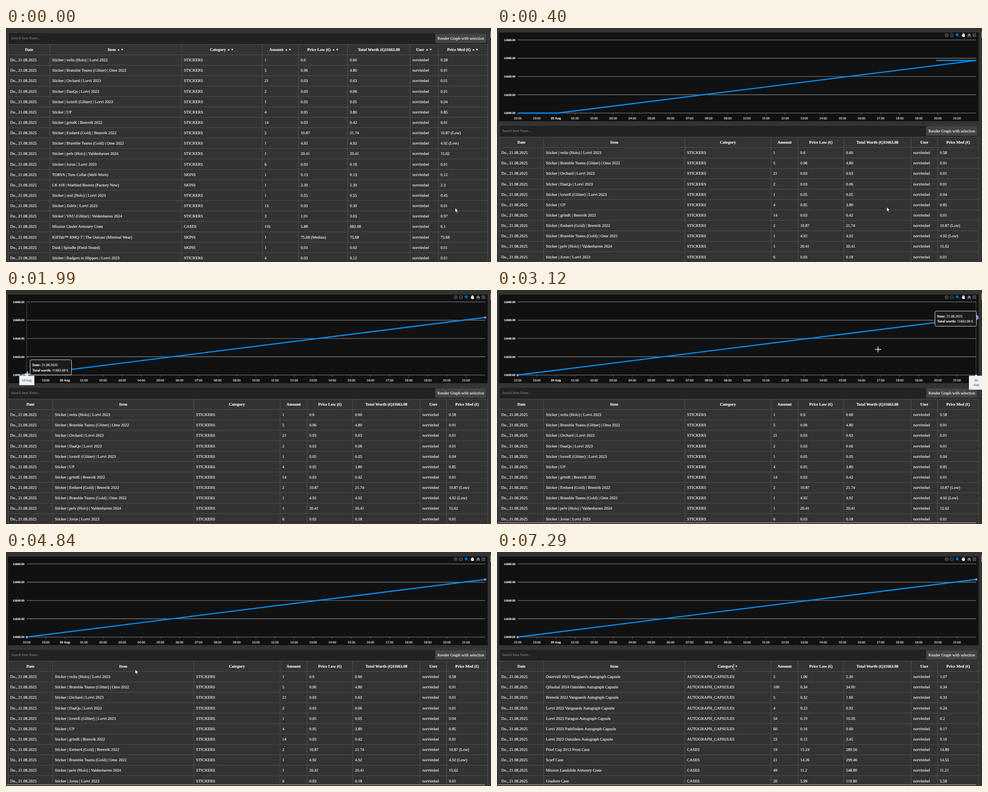
An HTML page that plays this animation: 1077x520 px, repeating every 8000 ms.

```html
<!DOCTYPE html>
<html lang="en">
<head>
<meta charset="utf-8">
<title>Inventory worth</title>
<style>
  html, body { margin: 0; width: 100%; height: 100%; overflow: hidden; background: #333; }
  svg { display: block; width: 1077px; height: 520px; }
  text { font: 9.05px "Liberation Serif", serif; fill: #fff; stroke: #fff; stroke-width: 0.14px;
    text-rendering: geometricPrecision; white-space: pre; }
  .b { font-weight: 700; }
  .mid { text-anchor: middle; }
  .end { text-anchor: end; }
  .hint { font-size: 7.9px; fill: #959595; stroke: none; }
  .tip { font-size: 7.95px; }
  .x { font: 6.8px "Liberation Sans", sans-serif; }
  .x.b { font-weight: 700; }
  .y { font: 700 6.2px "Liberation Sans", sans-serif; }
  .dark { fill: #373d3f; stroke: none; }
</style>
</head>
<body>
<svg id="stage" viewBox="0 0 1077 520"></svg>
<script>
const LOOP = 8000, STEP = 66.2, PITCH = 23.14;
const stage = document.getElementById('stage');

function add(parent, tag, attrs = {}, content) {
  const node = document.createElementNS('http://www.w3.org/2000/svg', tag);
  for (const key in attrs) node.setAttribute(key, attrs[key]);
  if (content !== undefined) node.textContent = content;
  return parent.appendChild(node);
}
const group = (parent, attrs) => add(parent, 'g', attrs);
const rect = (parent, x, y, width, height, fill, more) =>
  add(parent, 'rect', { x, y, width, height, fill, ...more });
const path = (parent, d, stroke, width = 1, more) =>
  add(parent, 'path', { d, stroke, 'stroke-width': width, fill: 'none', ...more });
const label = (parent, x, y, str, cls = '') => add(parent, 'text', { x, y, class: cls }, str);
const show = (node, on) => node.setAttribute('visibility', on ? 'visible' : 'hidden');
const move = (node, x, y) => node.setAttribute('transform', `translate(${x} ${y})`);

// item ; category ; amount ; low price ; medium price
const parse = list => list.trim().split('\n').map(row => row.trim().split(';'));
const initial = parse(`
  Sticker | veltu (Holo) | Lorvi 2023;STICKERS;1;0.6;0.58
  Sticker | Bramble Teams (Glitter) | Ome 2022;STICKERS;5;0.96;0.91
  Sticker | Orchard | Lorvi 2023;STICKERS;21;0.03;0.01
  Sticker | DaaQo | Lorvi 2023;STICKERS;2;0.03;0.01
  Sticker | loruvE (Glitter) | Lorvi 2023;STICKERS;1;0.05;0.04
  Sticker | UP;STICKERS;4;0.95;0.85
  Sticker | grintK | Brenvik 2022;STICKERS;14;0.03;0.01
  Sticker | Ember4 (Gold) | Brenvik 2022;STICKERS;2;10.87;10.87 (Low)
  Sticker | Bramble Teams (Gold) | Ome 2022;STICKERS;1;4.92;4.92 (Low)
  Sticker | pelv (Holo) | Valdenhaven 2024;STICKERS;1;20.41;15.62
  Sticker | Jorun | Lorvi 2023;STICKERS;6;0.03;0.01
  TORVA | Torn Collar (Well-Worn);SKINS;1;0.13;0.12
  LK 418 | Marbled Bronze (Factory New);SKINS;1;2.39;2.3
  Sticker | otul (Holo) | Lorvi 2023;STICKERS;1;0.55;0.45
  Sticker | Zelrix | Lorvi 2023;STICKERS;13;0.03;0.01
  Sticker | VAU (Glitter) | Valdenhaven 2024;STICKERS;3;1.01;0.97
  Mission Cinder Armoury Crate;CASES;116;5.88;6.1
  KillTab™ RMQ-T | The Outcast (Minimal Wear);SKINS;1;75.68 (Median);75.68
  Dusk | Spindle (Field-Tested);SKINS;1;0.03;0.01
  Sticker | Badgers in Slippers | Lorvi 2023;STICKERS;4;0.03;0.01`);
const ascending = parse(`
  Ostervall 2021 Vanguards Autograph Capsule;AUTOGRAPH_CAPSULES;5;1.06;1.07
  Qiluohai 2024 Outsiders Autograph Capsule;AUTOGRAPH_CAPSULES;100;0.34;0.34
  Brenvik 2022 Vanguards Autograph Capsule;AUTOGRAPH_CAPSULES;5;0.32;0.33
  Lorvi 2023 Vanguards Autograph Capsule;AUTOGRAPH_CAPSULES;4;0.23;0.24
  Lorvi 2023 Paragon Autograph Capsule;AUTOGRAPH_CAPSULES;54;0.19;0.2
  Lorvi 2023 Pathfinders Autograph Capsule;AUTOGRAPH_CAPSULES;60;0.16;0.17
  Lorvi 2023 Outsiders Autograph Capsule;AUTOGRAPH_CAPSULES;23;0.15;0.16
  Pixel Cup 2013 Frost Case;CASES;19;15.24;14.89
  Scarf Case;CASES;21;14.26;14.55
  Mission Landslide Armoury Crate;CASES;49;11.2;11.21
  Gradient Case;CASES;20;5.99;5.58`);
const descending = initial.filter(row => row[1] === 'STICKERS').reverse();

const TITLES = ['Date', 'Item', 'Category', 'Amount', 'Price Low (€)',
  'Total Worth (€)11663.08', 'User', 'Price Med (€)'];
const WIDE = [5, 97.5, 390, 569, 649.5, 758.5, 897.5, 960, 1069.5];
const NARROW = [5, 103.5, 417, 608.5, 668.5, 770, 919.5, 978.5, 1069.5];

function arrow(parent, x, y, up) {
  const s = up ? -1 : 1;
  add(parent, 'path', { d: `M${x - 2.2} ${y - 1.8 * s}h4.4l-2.2 ${3.8 * s}z`, fill: '#fff' });
}

function buildFrame(parent, top, cols) {
  rect(parent, 5, top, 1064.5, 26.5, '#212323', { stroke: '#4b4b4b' });
  label(parent, 11.5, top + 15.2, 'Search Item Name...', 'hint');
  rect(parent, 953, top + 2, 114, 21.5, '#444', { rx: 2 });
  label(parent, 1010, top + 16.4, 'Render Graph with selection', 'mid');
  let d = '';
  for (let y = top + 26.5; y < 525; y += PITCH) d += `M5 ${y}H1069.5`;
  cols.forEach(x => d += `M${x} ${top + 26.5}V520`);
  path(parent, d, '#555', 0.9);
}

function buildRows(parent, top, cols, rows) {
  rows.forEach(([item, category, amount, low, med], i) => {
    const y = top + 64.2 + i * PITCH;
    if (y > 530) return;
    const total = (amount * parseFloat(low)).toFixed(2);
    ['Do., 21.08.2025', item, category, amount, low, total, 'norvimbel', med]
      .forEach((str, c) => label(parent, cols[c] + (c ? 4.9 : 4.4), y, str));
  });
}

function buildTitles(parent, top, cols, shift) {
  TITLES.forEach((str, c) =>
    label(parent, (cols[c] + cols[c + 1]) / 2 - shift(c), top + 41, str, 'b mid'));
}

// Table before the graph is rendered
const plain = group(stage);
buildFrame(plain, 10, WIDE);
buildTitles(plain, 10, WIDE, c => c === 0 || c === 5 ? 0 : 9);
[250, 494.5, 622.5, 727.5, 935, 1038].forEach(x => {
  arrow(plain, x, 48.2, true);
  arrow(plain, x + 8, 48.2, false);
});
buildRows(plain, 10, WIDE, initial);

// Table below the graph, in three sort orders
const charted = group(stage);
buildFrame(charted, 216, NARROW);
const orders = [initial, descending, ascending].map((rows, n) => {
  const g = group(charted);
  buildTitles(g, 216, NARROW, c => n && c === 2 ? 5.2 : 0);
  if (n) arrow(g, 531.5, 254.2, n === 1);
  buildRows(g, 216, NARROW, rows);
  return g;
});

// Graph
const L = 46, R = 1064, BASE = 189, PEAK = 61;
rect(charted, 4.5, 10, 1065, 197, '#111');
for (let i = 0; i < 5; i++) {
  const y = 26.5 + i * 40.62;
  path(charted, `M${L} ${y}H${R}`, '#8c8c8c', 1.1);
  label(charted, 41, y + 2.3, `${11680 - i * 20}.00`, 'y end');
}
for (let i = 0; i < 24; i++) {
  const x = L + i * 42.41, hour = (22 + i) % 24;
  path(charted, `M${x} ${BASE}v4`, '#8c8c8c', 0.7);
  label(charted, x, 202.6, hour ? `${hour}`.padStart(2, '0') + ':00' : '20 Aug', hour ? 'x mid' : 'x mid b');
}
const guide = path(charted, '', '#b6b6b6', 0.8, { 'stroke-dasharray': '1.8 1.8' });
const curve = path(charted, '', '#0284e3', 2.8);
const clip = add(add(stage, 'defs'), 'clipPath', { id: 'panel' });
rect(clip, 4.5, 10, 1065, 197);
const dots = group(charted, { 'clip-path': 'url(#panel)' });
const [dotL, dotR] = [[L, BASE], [R, PEAK]].map(([cx, cy]) =>
  add(dots, 'circle', { cx, cy, r: 2.6, fill: '#9b80f5' }));

// Graph tools
const GREY = '#6e8192';
[998.5, 1010].forEach((x, i) => {
  add(charted, 'circle', { cx: x, cy: 16, r: 3.7, fill: 'none', stroke: GREY, 'stroke-width': 0.9 });
  path(charted, `M${x - 2} 16h4` + (i ? '' : `M${x} 14v4`), GREY, 0.9);
});
add(charted, 'circle', { cx: 1021.8, cy: 15, r: 2.4, fill: 'none', stroke: '#008ffb', 'stroke-width': 1.2 });
path(charted, 'M1023.5 16.7l3 3M1020.6 15h2.4M1021.8 13.8v2.4', '#008ffb', 1);
path(charted, 'M1033.6 17v-3.3M1035.2 16v-4M1036.8 16v-3.6M1038.3 16.5v-2.6M1032.2 16.2l1.6 1.6', '#eee', 1.3,
  { 'stroke-linecap': 'round' });
rect(charted, 1033, 15.5, 5.9, 4.6, '#eee', { rx: 1.5 });
add(charted, 'path', { d: 'M1043.8 16.2l4.7-4.4 4.7 4.4h-1.4v3.8h-2.2v-2.8h-2.2v2.8h-2.2v-3.8z', fill: GREY });
path(charted, 'M1056 13.3h8.4M1056 16.1h8.4M1056 18.9h8.4', GREY, 1.2);

// Tooltips
const tips = group(charted);
const box = group(tips);
rect(box, 53.5, 155, 92, 33.8, '#1c1c1c', { rx: 3, stroke: '#e3e3e3' });
[['Date:', ' 21.08.2025', 169], ['Total worth:', ' 11663.08 €', 180.7]].forEach(([name, value, y]) => {
  const line = label(box, 58.5, y, '', 'tip');
  add(line, 'tspan', { class: 'b' }, name);
  add(line, 'tspan', {}, value);
});
const dates = [[46.2, 33.5, 21, ['19 Aug']], [R, 32, 31, ['20', 'Aug']]].map(([x, w, h, lines]) => {
  const g = group(tips);
  add(g, 'path', { d: `M${x - w / 2} 190.5h${w / 2 - 3}l3-3 3 3h${w / 2 - 3}v${h}h${-w}z`, fill: '#eff2f4' });
  lines.forEach((str, i) => label(g, x, 203.2 + i * 10, str, 'x mid dark'));
  return g;
});

// Scrollbars
rect(stage, 1075.6, 7, 1.4, 15, '#9f9f9f');
const scrollbar = rect(stage, 2, 516.4, 1062, 1.5, '#9f9f9f');

// Mouse cursors
const pointer = path(stage, 'M0 0V9.6L2.2 7.6 3.8 11.3 5.4 10.6 3.8 7H6.8Z', '#111', 0.6, { fill: '#fff' });
const cross = path(stage, 'M-6.8 0H6.8M0-6.8V6.8', '#fff', 1.4);
const beam = path(stage, 'M-2.6-6Q0-6 0-5Q0-6 2.6-6M0-5V5M-2.6 6Q0 6 0 5Q0 6 2.6 6', '#ddd', 0.9);

const ROUTE = [
  [0, 997.5, 400], [70, 985, 400], [400, 868.5, 398], [860, 600, 406], [920, 575, 400],
  [1200, 290, 275], [1400, 140, 186], [1590, 46, 188], [1930, 46, 188], [1990, 47.5, 187],
  [2660, 47.5, 187], [2880, 520, 150], [3120, 847, 132], [3340, 1000, 29], [3450, 1030, 45],
  [3790, 1030, 45], [4000, 900, 130], [4180, 690, 215], [4450, 260, 275], [4540, 130, 282],
  [4640, 168, 276], [4840, 287, 261], [5100, 280, 260], [5370, 268.5, 257.7], [5570, 268.5, 257.7],
  [5800, 420, 246], [5970, 533, 252], [6110, 533, 252], [6560, 522, 255], [6970, 522, 255],
  [7030, 526, 255.7], [LOOP, 526, 255.7]];
const CHART_AT = 125, ENTER = 1390, SWITCH = 2900, LEAVE = 4125;
const SORT_DOWN = 6480, SORT_UP = 7210;

const unit = v => Math.min(1, Math.max(0, v));
const ease = v => 0.5 - Math.cos(Math.PI * unit(v)) / 2;

function cursorAt(t) {
  const i = Math.max(1, ROUTE.findIndex(p => p[0] >= t));
  const [t0, x0, y0] = ROUTE[i - 1], [t1, x1, y1] = ROUTE[i];
  const k = unit((t - t0) / (t1 - t0));
  return [x0 + (x1 - x0) * k, y0 + (y1 - y0) * k];
}

function draw(time) {
  const step = Math.floor(time / STEP + 0.12);
  const t = step && step * STEP + 8;
  const hasChart = t >= CHART_AT;
  plain.style.display = hasChart ? 'none' : '';
  charted.style.display = hasChart ? '' : 'none';
  const order = t >= SORT_UP ? 2 : t >= SORT_DOWN ? 1 : 0;
  orders.forEach((g, i) => g.style.display = i === order ? '' : 'none');

  const p = ease((t - 122) / 350), w = R - L, top = BASE - (BASE - PEAK) * p;
  curve.setAttribute('d', p < 1
    ? `M${L} ${BASE}H${L + (1 - p) * w}L${R} ${top}H${L + p * w}`
    : `M${L} ${BASE}L${R} ${PEAK}`);
  show(dots, p === 1);

  const hover = t >= ENTER && t < LEAVE, right = t >= SWITCH;
  dotL.setAttribute('r', hover && !right ? 4.8 : 2.6);
  dotR.setAttribute('r', hover && right ? 5.8 : 2.6);
  guide.setAttribute('d', hover ? `M${right ? R - 0.3 : L} 26.5V${BASE}` : '');
  tips.setAttribute('opacity', hover ? unit((t - ENTER) / 150) : 0);
  const slide = ease((t - SWITCH) / 150);
  move(box, 919 * slide, -108.2 * slide);
  dates.forEach((g, i) => g.style.display = right === !!i ? '' : 'none');
  show(scrollbar, right);

  const [x, y] = cursorAt(t);
  const isBeam = t > 5200 && t < 5640 || t > 6350;
  [[pointer, !hover && !isBeam], [cross, hover], [beam, isBeam]].forEach(([node, on]) => {
    show(node, on);
    move(node, x, y);
  });
}

const start = performance.now();
function tick() {
  draw((performance.now() - start) % LOOP);
  requestAnimationFrame(tick);
}
tick();
</script>
</body>
</html>
```
